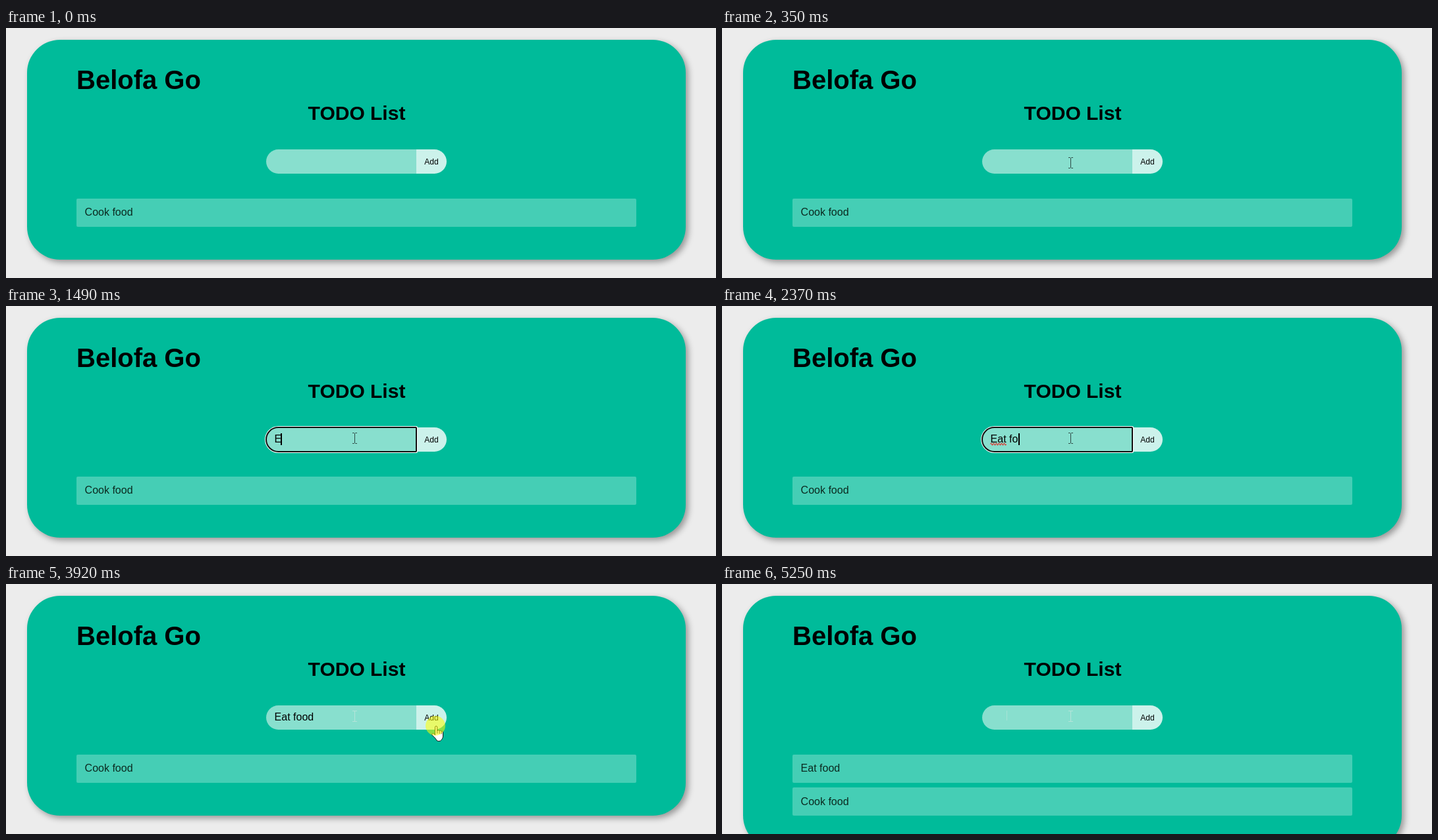
Write an HTML page that moves like this. It is 1078 px wide and 381 px high and loops after 6170 ms.

```html
<!DOCTYPE html>
<html lang="en">
<head>
<meta charset="utf-8">
<title>Todo list</title>
<style>
  html, body { margin: 0; width: 100%; height: 100%; overflow: hidden; background: #ececec; }
  svg { display: block; font: 16px "Liberation Sans", Arial, sans-serif; }
  text { white-space: pre; }
  #card { fill: #00bb9a; filter: drop-shadow(4px 4px 5px rgba(0, 0, 0, .36)); }
  .item { fill: #fff; fill-opacity: .27; }
  .hover { fill-opacity: .36; }
  .field { fill: #88dfce; }
  .wave { fill: none; stroke: #e0302a; stroke-width: 1.1; }
  .beam { fill: none; stroke: #2d4a45; }
  .ghost { fill: none; stroke: #b4e4d9; }
  .cursor { fill: #fff; stroke: #111; stroke-linejoin: round; }
</style>
</head>
<body>
<svg width="1078" height="381" viewBox="0 0 1078 381">
  <rect id="card" x="32" y="18" width="1000" height="335" rx="50"/>
  <text x="107" y="92.5" font-size="40" font-weight="700">Belofa Go</text>
  <text x="532.5" y="140" font-size="30" font-weight="700" text-anchor="middle">TODO List</text>

  <rect id="row1" class="item" x="107" y="260" width="850" height="43" rx="2"/>
  <text id="label1" x="119.6" y="286" fill="#0b2a20"></text>
  <g id="second">
    <rect class="item" x="107" y="310" width="850" height="43" rx="2"/>
    <text x="119.6" y="337" fill="#0b2a20">Cook food</text>
  </g>

  <path d="M623 185h27.5a18.5 18.5 0 0 1 0 37H623z" fill="#ccf2eb"/>
  <text x="646" y="208" font-size="12" text-anchor="middle">Add</text>
  <path class="field" d="M623 185h-209.5a18.5 18.5 0 0 0 0 37H623z"/>
  <g id="focus">
    <path d="M623 183h-209.5a20.5 20.5 0 0 0 0 41H623q2 0 2-2V185q0-2-2-2z" fill="#fff"/>
    <path d="M622 184h-208.5a19.5 19.5 0 0 0 0 39H622q2 0 2-2V186q0-2-2-2z" fill="#101010"/>
    <path class="field" d="M622 186h-208.5a17.5 17.5 0 0 0 0 35H622z"/>
  </g>
  <text id="typed" x="407.6" y="208"></text>
  <path id="wave1" class="wave"/>
  <path id="wave2" class="wave"/>
  <rect id="caret" y="194" width="2" height="18"/>

  <g id="menu">
    <rect x="394" y="222" width="241" height="67" rx="3" fill="#292a2d"
      style="filter: drop-shadow(0 1px 1.5px rgba(0, 0, 0, .5))"/>
    <text x="406.5" y="261" fill="#e8eaed" font-size="15.7" font-weight="600"
      font-family="Open Sans, Noto Sans, sans-serif">Cook food</text>
  </g>

  <path id="beamGhost" class="ghost" d="M526 193.5h7M529.5 194v15M526 209.5h7"/>
  <path id="caretGhost" class="ghost" d="M432.5 193v15" stroke-opacity=".7"/>
  <path id="beam" class="beam" d="M526 .5h2.5l1 1 1-1h2.5M529.5 1v15M526 16.5h2.5l1-1 1 1h2.5"/>
  <path id="arrow" class="cursor" d="M.5 .5V16.2L4.1 12.8 6.4 18.3 8.9 17.2 6.6 11.8H11.5z"/>
  <g id="hand" class="cursor">
    <path d="M5.5 14V2.2a1.6 1.6 0 0 1 3.2 0V8q0-1.2 1.5-1.2T12 8.3q.3-.9 1.5-.9 1.5 0 1.6 1.5.3-.6 1.2-.6 1.2 0 1.2 1.5V16q0 2-1 3.5-.9 2-3 3.6-2.8 1-5.2-.3-1.2-2-2.6-3.8L1.2 14.5q-1-1.5 0-2.4t2.6.3z"/>
    <path d="M8.7 8v4M12 8.3v4M15.1 9v3.5" fill="none"/>
  </g>
  <circle id="click" cx="652" cy="216" r="15" fill="#ffff00" fill-opacity=".55"/>
</svg>
<script>
  const LOOP = 6170;
  const $ = id => document.getElementById(id);

  // [start time, typed length, caret x]
  const keys = [
    [1020, 0, 407], [1490, 1, 417], [1700, 2, 427], [1920, 3, 431],
    [2150, 4, 436], [2370, 6, 450], [2590, 7, 459], [2810, 8, 468]
  ];

  // [start time, cursor, x, y]
  const pointer = [
    [0], [130, 'arrow', 582, 235], [350, 'beam', 0, 197], [580, 'beam', 0, 193],
    [3700, 'hand', 646, 219], [3920, 'hand', 646, 216],
    [4810, 'arrow', 782, 284], [5030, 'arrow', 979, 369], [5250]
  ];

  const at = (list, t) => list.findLast(step => step[0] <= t);
  const show = (id, on) => $(id).setAttribute('visibility', on ? 'visible' : 'hidden');
  const wave = (x, end) => {
    let d = `M${x} 210.5`;
    for (; x < end; x += 4) d += 'q1-3 2 0t2 0';
    return d;
  };
  $('wave1').setAttribute('d', wave(407.5, 431));
  $('wave2').setAttribute('d', wave(437, 468));

  function draw(now) {
    const t = now % LOOP;
    const between = (a, b) => t >= a && t < b;
    const added = t >= 4140;

    $('card').setAttribute('height', added ? 385 : 335);
    $('label1').textContent = added ? 'Eat food' : 'Cook food';
    $('row1').classList.toggle('hover', between(130, 350));
    show('second', added);

    const key = at(keys, t);
    $('typed').textContent = key && !added ? 'Eat food'.slice(0, key[1]) : '';
    if (key) $('caret').setAttribute('x', key[2]);
    show('caret', between(1020, 3260) || between(3700, 3920));
    show('focus', between(1020, 3920));
    show('menu', between(1020, 1490));
    show('wave1', between(2150, 3920));
    show('wave2', between(3700, 3920));
    show('beamGhost', t >= 3700);
    show('caretGhost', added);
    show('click', between(3920, 4140));

    const [, cursor, x, y] = at(pointer, t);
    for (const id of ['arrow', 'beam', 'hand']) show(id, id === cursor);
    if (cursor) $(cursor).setAttribute('transform', `translate(${x} ${y})`);

    requestAnimationFrame(loop);
  }

  const start = performance.now();
  const loop = () => draw(performance.now() - start);
  loop();
</script>
</body>
</html>
```
